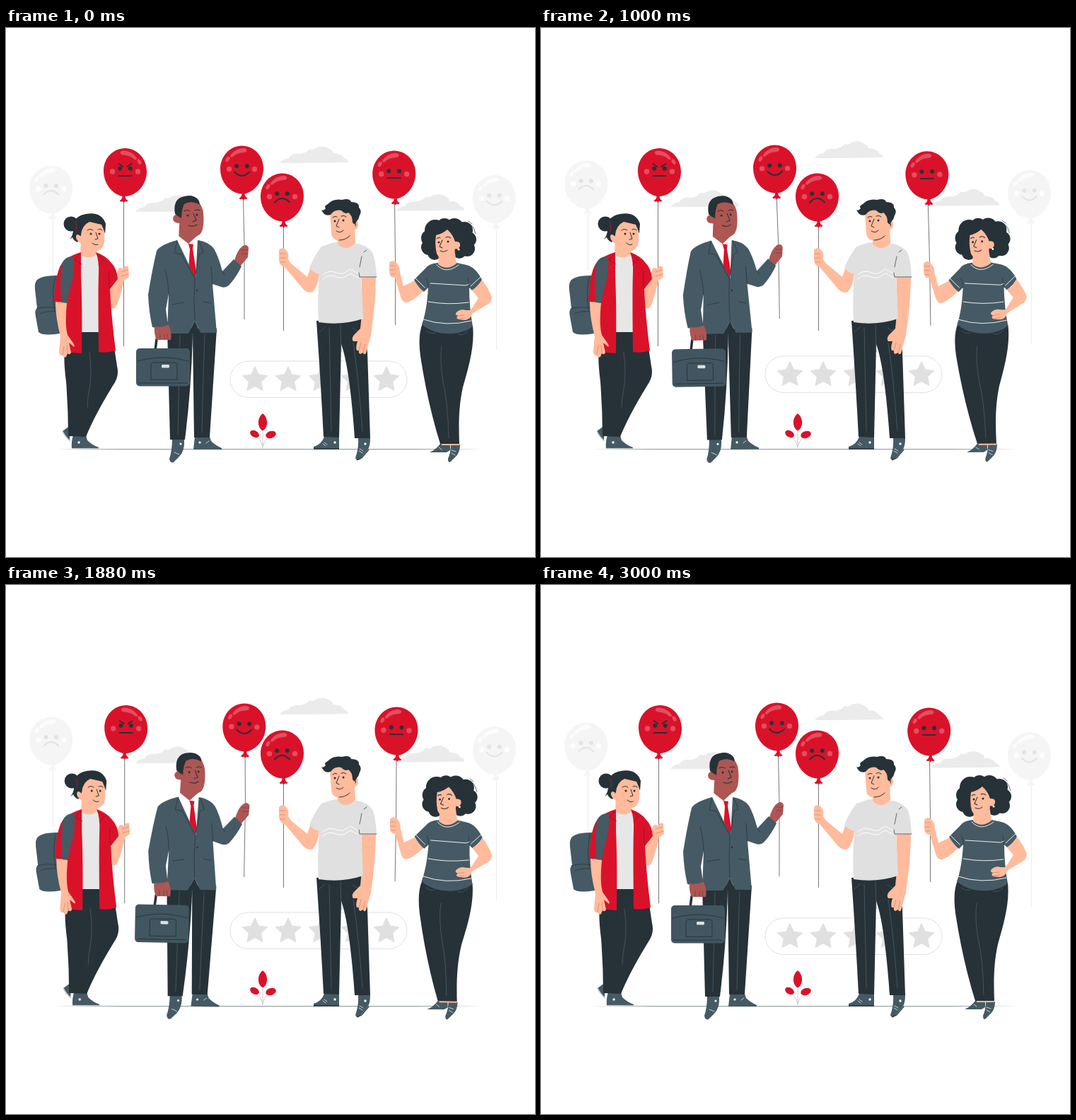
An HTML page that plays this animation: 748x748 px, repeating every 3.04 s.

```html
<!DOCTYPE html>
<html lang="en">
<head>
<meta charset="utf-8">
<title>Feedback balloons</title>
<style>
html, body { margin: 0; width: 100%; height: 100%; overflow: hidden; background: #fff }
svg { display: block; width: 100%; height: 100% }
.k { fill: #263238 } .g { fill: #455a64 } .d { fill: #415660 } .r { fill: #d9122a }
.s { fill: #ffbb9c } .b { fill: #ad5653 } .e { fill: #e0e0e0 } .w { fill: #fff }
.line { fill: none; stroke: #263238; stroke-width: 1; stroke-linecap: round; stroke-linejoin: round }
.soft { stroke: #51646e; stroke-width: .7 }
.white { stroke: #fff }
.string { fill: none; stroke: #555; stroke-width: .8 }
</style>
</head>
<body>
<svg viewBox="0 0 748 748">
<defs>
  <path id="cloud" d="M387 191Q391 185 400 184Q403 177 414 178Q424 178 429 171Q436 173 439 169Q450 165 457 171Q463 173 462 177Q474 177 478 184Q483 185 484 190Q440 191 387 191Z"/>
  <path id="shell" d="M0 0C17 0 30.500 14 30.500 32C30.500 50 18 65 4 68Q4 72 8 74Q6 77 4 75L2 77L0 75Q-2 77-4 74Q0 72 0 68C-17 67-30.500 51-30.500 33C-30.500 15-17 0 0 0Z"/>
  <g id="shine" fill="#fff">
    <path d="M-15 12C-11 7-4 3 3 3.500C8 4 8 9 3 9.500C-3 10-8 11-12 15C-16 18-18 15-15 12Z"/>
    <ellipse cx="-20" cy="19" rx="2.500" ry="4" transform="rotate(30 -20 19)"/>
  </g>
</defs>

<g id="backdrop">
  <path d="M66.500 266V350M693.500 282V455" stroke="#ececec"/>
  <g data-mood="sad" data-pale="1" transform="translate(63.700 194.500)"/>
  <g data-mood="happy" data-pale="1" transform="translate(690.500 208)"/>
  <g fill="#ebebeb">
    <use href="#cloud"/><use href="#cloud" x="-204" y="69"/><use href="#cloud" x="164.500" y="67.500"/>
  </g>
  <rect x="317" y="471" width="250" height="51.500" rx="25.700" fill="#fff" stroke="#e0e0e0"/>
  <g id="stars" class="e"></g>
</g>

<path d="M70 595.500L160 595H580L674 595.600L580 596.300H160Z" fill="#9aa3a7"/>

<!-- plant -->
<path class="line" style="stroke:#c9cdcf" d="M363 594V565M363 592Q360 581 353 577M363 592Q366 581 373 577"/>
<g class="r">
  <path d="M363 545C371 551 371 564 364 569H362C355 564 355 551 363 545Z"/>
  <ellipse cx="351.500" cy="574" rx="6.800" ry="4.600" transform="rotate(28 351.500 574)"/>
  <ellipse cx="374.500" cy="575" rx="7.500" ry="4.900" transform="rotate(-18 374.500 575)"/>
</g>

<g id="student">
  <path class="string" d="M166.500 245V450"/>
  <g data-mood="angry" transform="translate(168.500 170) scale(-1 1)"/>
  <path class="g" d="M75 350Q52 349 44 356Q40 360 41 370L44 396Q40 399 42 408L46 430Q52 436 76 432Z"/>
  <path class="line soft" style="stroke:#263238" d="M43 397Q55 393 72 396M48 404Q55 400 70 401M69 353Q64 380 69 400"/>
  <path class="g" d="M91 562L80 570Q84 577 90 583Z"/>
  <path d="M80 570Q84 579 91 584" fill="none" stroke="#bcc4c8" stroke-width="1.500"/>
  <path class="g" d="M95 576H113L115 583Q122 590 131 593V595H93Q92 585 95 576Z"/>
  <path d="M93 594.500H131" stroke="#c4cbce"/>
  <circle class="w" cx="103" cy="586" r="1.700"/>
  <path class="k" d="M83 450Q81 470 85 500Q88 540 88 577L113 578Q126 546 154 501Q160 490 157 478L149 425H90Z"/>
  <path class="line soft" d="M118 458Q122 490 118 510Q115 525 115 536"/>
  <path class="e" style="fill:#e7e7e7" d="M105 318H128L133 332V430H105Z"/>
  <path class="s" d="M106 300L105 320Q117 329 128 320V305Z"/>
  <path class="s" d="M148 357Q146 380 147 391Q149 399 154 396Q159 392 167 357L174 352L173 337Q168 335 166 340L160 339Q155 346 156 354L153 369L158 353Z"/>
  <path class="r" d="M106 317Q92 321 82 329Q70 340 68 386L85 389L80 458L107 460Q108 390 106 350Z"/>
  <path class="r" d="M127 317Q141 322 148 331Q157 340 158 355L147 369Q149 410 155 456Q143 460 131 458Q130 370 131 348Q132 330 127 317Z"/>
  <path class="line soft" style="stroke:#8d0c20" d="M104 320L97 328L107 334M129 320L138 328L131 334M147 368Q144 355 146 344M85 388Q88 370 87 360"/>
  <path class="g" d="M92 323Q83 324 79 333Q75 360 79 395H85Q90 368 94 356Q97 338 96 324Z"/>
  <path class="s" d="M70 387L86 389Q83 420 87 434L96 447Q98 453 94 449L89 445L92 459Q90 463 87 460L85 465Q82 467 80 463Q75 464 75 457L77 436Q70 410 70 387Z"/>
  <path class="line soft" style="stroke:#d17f68" d="M80 462L82 450M87 460L86 449M163 351L173 348M163 345L172 342"/>
  <circle class="k" cx="92" cy="277" r="10.500"/>
  <path class="s" d="M106 274Q120 268 137 277Q141 298 138 307Q133 317 122 316Q110 315 105 304Q97 300 103 291Z"/>
  <path class="k" d="M95 285Q94 266 113 263Q135 259 141 277L140 291Q138 284 135 278L118 274Q107 279 106 293L101 303Q95 300 94 296L90 299Q95 293 95 285Z"/>
  <path class="s" d="M105 294Q99 289 99 296Q100 303 107 302Z"/>
  <path class="line" style="stroke:#a51b2a" d="M98 274Q101 280 99 287"/>
  <g class="k"><circle cx="120" cy="291" r="1.500"/><circle cx="132" cy="291" r="1.500"/></g>
  <path class="line" d="M115 286Q119 283 123 286M130 285Q134 283 136 286M127 289L130 298L126 299M122 304Q126 308 130 306"/>
</g>

<g id="manager">
  <path class="string" d="M335.500 242L337 308V412"/>
  <g data-mood="happy" transform="translate(333.500 166.500)"/>
  <path class="g" d="M235 580L252 582Q253 598 245 606L237 614Q232 616 231 609Q235 598 235 580Z"/>
  <path class="g" d="M267 578H288L290 584Q296 590 305 594V596H265Z"/>
  <g class="w"><circle cx="247" cy="588" r="1.600"/><circle cx="274" cy="586" r="1.600"/></g>
  <path class="line soft white" d="M238 600L245 603M283 587L287 584"/>
  <path class="k" d="M228 425L232 582H253Q262 510 264 435L266 579H288L298 425Z"/>
  <path class="line soft" d="M246 434L243 575M281 434Q279 480 277 572M264 432V450"/>
  <path class="w" d="M242 302L253 291L270 298L268 354Z"/>
  <path class="b" d="M245 278L244 300Q257 313 270 298L271 285Z"/>
  <path class="w" d="M244 294L240 307L250 313L258 305ZM270 294L258 305L267 311L272 302Z"/>
  <path class="r" d="M258 305L265 306L264 312L269 344L267 354L258 342L260 313Z"/>
  <path class="b" d="M322 333Q326 314 335 308Q341 305 343 311L342 324Q338 329 331 337Z"/>
  <path class="line soft" style="stroke:#7c3535" d="M333 314L342 314M333 319L342 319"/>
  <path class="g" d="M242 300Q219 306 213 315Q207 340 201 377Q202 402 207 423Q220 427 229 420L226 398L230 376L228 432H258L267 414L275 431H298L292 362L304 366Q310 368 315 364Q326 352 333 337L322 327L306 344Q300 322 294 312Q286 302 271 300L268 354Z"/>
  <path class="line soft" style="stroke:#263238" d="M242 301L238 318L248 320L267 354L273 320L279 317L273 301M267 354Q265 385 267 414M230 376Q229 353 225 342M292 362L290 337M306 344L309 349M235 391L252 388M279 387L290 389"/>
  <circle class="k" cx="270" cy="371" r="1.200"/>
  <path class="k" d="M258 432L267 414L275 432Z"/>
  <path d="M211 456L213 440Q214 437 218 437H227Q231 437 232 441L235 456" fill="none" stroke="#263238" stroke-width="3.500"/>
  <path class="b" d="M210 422Q219 424 230 420Q235 431 233 441H213Q209 433 210 422Z"/>
  <path class="line soft" style="stroke:#7c3535" d="M218 440V433M224 440V433M229 440L228 433"/>
  <rect class="d" x="184" y="453" width="76" height="53.500" rx="5"/>
  <path class="line soft" style="stroke:#1f292e" d="M186 471L200 468Q222 464 244 468L258 471M205 497V477Q205 473 209 473H238Q242 473 242 477V497ZM188 502H256"/>
  <rect class="w" x="220" y="476" width="11" height="4.500" rx="1.500" style="fill:#dce1e3"/>
  <path class="b" d="M244 265Q246 243 262 243Q277 244 279 262Q281 285 274 292Q266 298 256 293Q247 289 245 276Q236 276 236 269Q238 262 244 265Z"/>
  <path class="k" d="M239 263Q236 246 246 240Q263 233 272 243Q274 246 274 250Q262 243 252 249Q248 257 248 269L243 266Z"/>
  <g class="k"><circle cx="257" cy="265" r="1.500"/><circle cx="270" cy="264" r="1.500"/></g>
  <path class="line" d="M252 259Q256 256 260 259M267 258Q271 256 274 258M265 262L269 272L264 274M258 279Q264 282 270 278"/>
</g>

<g id="dad">
  <path class="string" d="M392.500 280V428"/>
  <g data-mood="sad" transform="translate(390.500 205.500)"/>
  <path class="g" d="M450 578H471V595H435V592Q446 589 450 578Z"/>
  <path class="g" d="M498 580H515Q515 592 511 597L501 609Q496 614 494 608Q499 594 498 580Z"/>
  <path d="M435 595H471M496 611L503 608L513 596" fill="none" stroke="#263238" stroke-width="1.300"/>
  <g class="w"><circle cx="465" cy="586" r="1.700"/><circle cx="508" cy="588" r="1.700"/></g>
  <path class="line soft white" d="M450 586L454 589M448 588L452 591M499 598L504 601M500 595L505 598"/>
  <path class="k" d="M439 414Q445 500 449 578L471 579L474 447Q486 480 493 580L515 580L511 458L505 410Z"/>
  <path class="line soft" d="M474 458L473 420M457 424L460 570M491 445Q499 500 504 570M443 430L451 423M490 424Q497 431 507 427"/>
  <path class="s" d="M431 338L443 347Q442 363 434 373Q427 376 420 369L394 338Q387 337 386 328L386 314Q390 309 395 313Q401 318 399 327L403 333L426 352Z"/>
  <path class="line soft" style="stroke:#d17f68" d="M387 319H395M387 325H395M388 331H395"/>
  <path class="s" d="M502 347H523Q523 380 519 411L516 435L512 449L509 460Q506 463 505 459L501 461Q498 460 499 456L496 456Q494 452 497 443L491 443Q488 439 492 434L501 425Q505 390 502 347Z"/>
  <path class="line soft" style="stroke:#d17f68" d="M499 456L502 445M505 459L508 447"/>
  <path class="e" d="M464 303L446 309Q436 322 429 339Q434 346 443 348Q440 385 442 416Q475 421 505 411L502 353L524 352Q523 328 518 317Q511 308 498 305Z"/>
  <path class="line soft white" style="stroke-width:1" d="M448 349Q456 342 464 345Q470 348 477 347L487 341L498 347M448 355Q456 348 464 351Q470 354 477 353L487 347L498 353"/>
  <path class="line soft" style="stroke:#263238" d="M524 352L500 352L499 346M500 338L503 323M506 317L510 314"/>
  <path class="s" d="M469 287V305Q481 318 494 304L493 280Z"/>
  <path class="s" d="M458 262Q473 251 490 260L493 272Q499 271 498 280Q496 287 490 285L488 292Q479 301 468 300Q460 298 460 289Z"/>
  <path class="k" d="M446 257Q449 259 452 255Q449 252 455 249Q463 241 475 243Q486 240 488 246Q500 246 499 254Q504 258 500 265Q499 270 496 273L493 278L490 275Q490 265 484 261Q480 264 474 258Q465 256 459 264Q450 267 446 257Z"/>
  <g class="k"><circle cx="465" cy="273" r="1.500"/><circle cx="477" cy="272" r="1.500"/></g>
  <path class="line" d="M462 268Q465 265 468 267M474 266Q478 264 481 267M471 270L467 280L471 282M467 287Q473 291 477 286M492 276Q496 275 494 280M471 300Q480 300 486 294"/>
</g>

<g id="mum">
  <path class="string" d="M549.500 248L550.500 330V420"/>
  <g data-mood="flat" transform="translate(548.700 173.500)"/>
  <path class="g" d="M614 588H628V597L623 600H599Q607 597 614 588Z"/>
  <path class="g" d="M629 589H642Q642 599 637 605L629 613Q625 616 625 609Q629 600 629 589Z"/>
  <path class="line soft white" d="M612 593L616 596M630 601L635 604M630 597L636 599"/>
  <path class="s" d="M616 584H641V590H616Z"/>
  <path class="k" d="M589 418Q582 434 586 464Q596 530 614 588H641C640 560 640 535 646 508C654 480 663 450 660 421Z"/>
  <path class="line soft" d="M616 450Q613 470 618 500Q625 530 626 580M594 428Q602 434 607 431M653 428Q647 436 639 433"/>
  <path class="s" d="M578 357L591 371Q578 384 568 388Q561 390 558 380L550 353Q542 353 542 344V332Q546 327 551 331Q557 335 557 345L562 365Z"/>
  <path class="line soft" style="stroke:#d17f68" d="M543 336H550M543 342H550M544 348H550"/>
  <path class="g" d="M611 332Q597 333 592 341L577 356Q584 368 591 373L597 367Q595 400 588 419Q605 434 634 432Q650 430 660 422Q655 395 655 367L659 371Q668 365 673 356Q664 338 651 335L637 332Z"/>
  <path class="line white" style="stroke-width:.9" d="M609 335Q622 349 640 335M600 361L650 364L655 362M597 387Q625 392 654 388M590 412Q622 423 658 414M578 353L592 367M671 352L657 365"/>
  <path class="line soft" style="stroke:#263238" d="M597 367Q597 358 594 354M655 367L653 354"/>
  <path class="s" d="M673 356Q683 369 687 381Q686 389 679 392L659 404Q657 412 649 413L640 412Q635 410 639 407Q633 405 638 401Q643 397 650 399L657 399L668 382L659 371Q668 365 673 356Z"/>
  <path class="line soft" style="stroke:#d17f68" d="M639 407L648 406M641 411L649 410"/>
  <g class="k" id="curls"></g>
  <path class="s" d="M612 320L611 334Q623 344 637 333L634 312Z"/>
  <path class="s" d="M608 293Q617 291 624 285Q632 292 635 302Q643 301 642 308Q640 314 635 312Q634 325 624 327Q613 328 609 319Q606 306 608 293Z"/>
  <circle cx="640" cy="313" r="1.500" fill="#fff"/>
  <path class="line soft" style="stroke:#263238" d="M651 275Q661 277 664 291M654 273L659 277"/>
  <g class="k"><circle cx="612" cy="303" r="1.500"/><circle cx="625" cy="302" r="1.500"/></g>
  <path class="line" d="M609 298Q612 295 614 297M622 296Q626 294 629 297M617 300L613 309L617 311M614 315Q620 318 624 314"/>
</g>
</svg>
<script>
const LOOP = 3040, CYCLE = 3000;
const $ = id => document.getElementById(id);

const mouths = {
  happy: 'M-10.500 37Q0 48 10.500 37',
  sad: 'M-10.500 41Q0 30 10.500 41',
  flat: 'M-9 38.500H9',
  angry: 'M-9 39H9'
};

for (const g of document.querySelectorAll('[data-mood]')) {
  const { mood, pale } = g.dataset;
  const ink = pale ? '#e3e3e3' : '#263238';
  const pair = (x, y, r) => [-x, x].map(cx => `<circle cx="${cx}" cy="${y}" r="${r}"/>`).join('');
  const brows = mood == 'angry' ? 'M-9 22L-3 26M9 22L3 26' : '';
  g.innerHTML = `
    <use href="#shell" fill="${pale ? '#f5f5f5' : '#d9122a'}"/>
    <use href="#shine" opacity="${pale ? .7 : .25}"/>
    <g fill="#fff" opacity="${pale ? .8 : .25}">${pair(18, 33, 3.7)}</g>
    <g fill="${ink}">${pair(7.3, 28.7, 3)}</g>
    <path d="${mouths[mood]}${brows}" fill="none" stroke="${ink}" stroke-width="2" stroke-linecap="round"/>`;
}

function star(cx, cy) {
  const points = Array.from({ length: 10 }, (_, i) => {
    const a = i * Math.PI / 5, r = i % 2 ? 9.2 : 18.8;
    return [cx + r * Math.sin(a), cy - r * Math.cos(a)].map(v => v.toFixed(1));
  });
  return `<polygon points="${points.join(' ')}" stroke="#e0e0e0" stroke-linejoin="round"/>`;
}
$('stars').innerHTML = [352, 399, 446, 492, 538].map(x => star(x, 497.5)).join('');

const curls = [[607, 286, 15], [620, 280, 11], [634, 282, 13], [648, 286, 12], [654, 299, 11],
  [652, 312, 11], [641, 316, 10], [599, 297, 12], [598, 310, 11], [606, 318, 10], [626, 300, 24]];
$('curls').innerHTML = curls.map(([x, y, r]) => `<circle cx="${x}" cy="${y}" r="${r}"/>`).join('');

function draw(now) {
  const turn = now % LOOP / CYCLE * 2 * Math.PI;
  const sway = Math.sin(2 * turn);
  const move = (id, value) => $(id).setAttribute('transform', value);
  move('backdrop', `translate(0 ${-4.7 * (1 - Math.cos(turn))})`);
  move('student', `translate(${1.2 * sway} 0)`);
  move('manager', `rotate(${sway} 273 391)`);
  move('mum', `rotate(${sway} 602 394)`);
  requestAnimationFrame(draw);
}
draw(performance.now());
</script>
</body>
</html>
```
